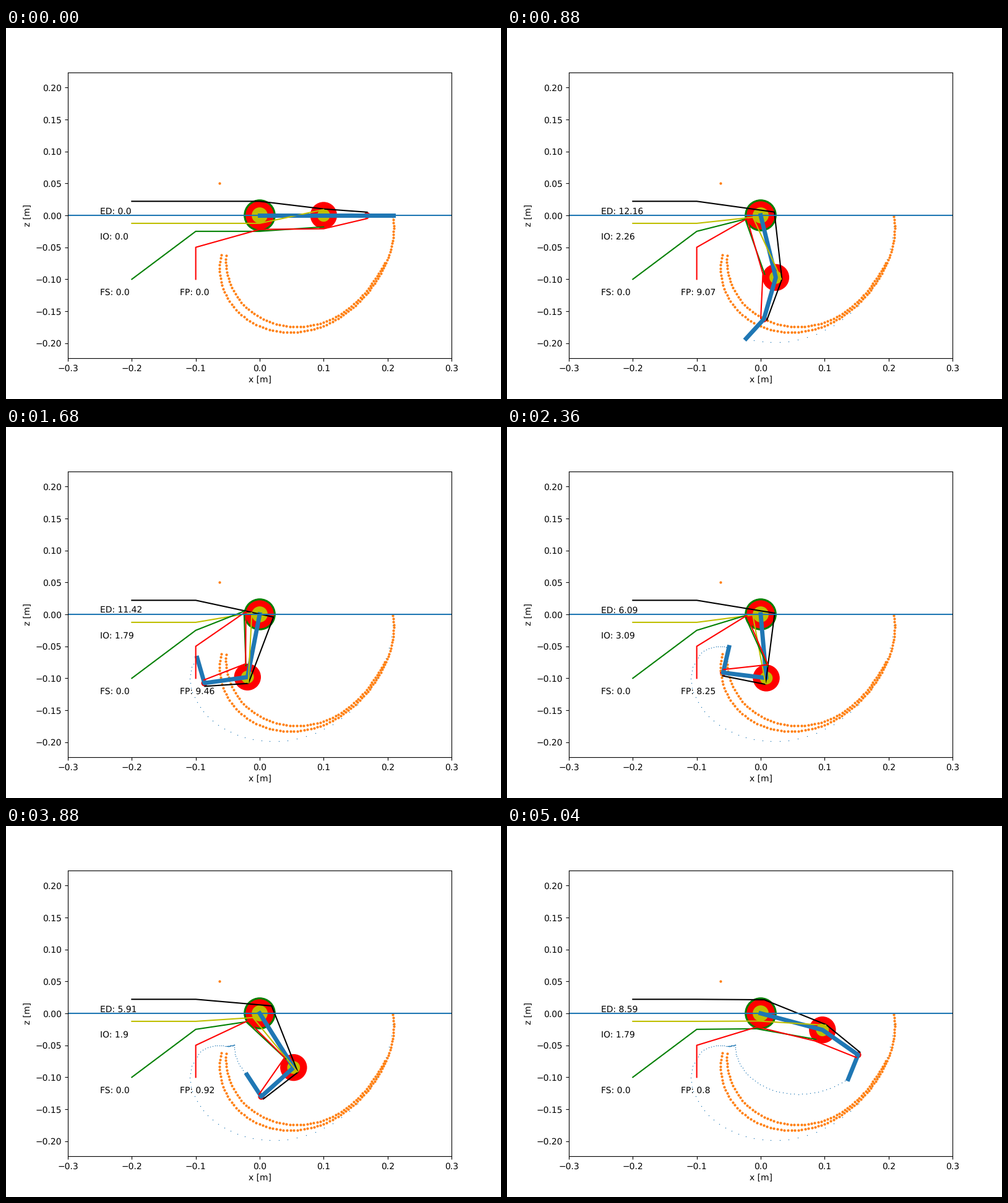
Write a matplotlib script that moves like this. It is 800x600 px and loops after 5080 ms.

```python
import numpy as np
import matplotlib.pyplot as plt
from matplotlib.animation import FuncAnimation

plt.rcParams["text.hinting"] = "none"

FRAMES, INTERVAL = 127, 40
LINKS = np.array([0.1, 0.068, 0.041])
PX = 620 / 0.6  # pixels per metre


def rise(p):
    return lambda s: s ** p


def settle(p):
    return lambda s: 1 - (1 - s) ** p


def sway(s):
    return s * s * (3 - 2 * s)


# last frame of each phase, joint angles reached in degrees, easing per joint
PHASES = [
    (42, (-101, -71, -82), (settle(1.9), rise(1.35), rise(1.75))),
    (59, (-85, -102, -96), (sway, settle(2), sway)),
    (84, (-82, -107, -100), (sway, sway, sway)),
    (126, (-15, -20, -77), (settle(1.2), rise(1), rise(2.5))),
]

# tendon forces at a few moments, linear in between
FORCE_TIMES = 0, 22, 42, 59, 81, 97, 126
FORCES = {
    "ED": (0, 12.16, 11.42, 6.09, 3.23, 5.91, 8.59),
    "IO": (0, 2.26, 1.79, 3.09, 0.69, 1.9, 1.79),
    "FP": (0, 9.07, 9.46, 8.25, 2.19, 0.92, 0.8),
}

# colour, fixed path, signed lever arm at each joint, label position
TENDONS = {
    "ED": ("k", [(-0.2, 0.022), (-0.1, 0.022)], (0.022, 0.01, 0.005), (-0.25, 0.0025)),
    "IO": ("y", [(-0.2, -0.0125), (-0.1, -0.0125)], (-0.0125, 0.009), (-0.25, -0.0375)),
    "FS": ("g", [(-0.2, -0.1), (-0.1, -0.025)], (-0.025, -0.018), (-0.25, -0.125)),
    "FP": ("r", [(-0.1, -0.1), (-0.1, -0.05)], (-0.022, -0.021, -0.005), (-0.125, -0.125)),
}

# joint, radius, colour
PULLEYS = [
    (0, 0.025, "g"), (0, 0.022, "r"), (0, 0.0125, "y"),
    (1, 0.021, "r"), (1, 0.01, "y"), (2, 0.005, "r"),
]


def joint_angles(i):
    first, pose = 0, np.zeros(3)
    for last, goal, eases in PHASES:
        s = min(max((i - first) / (last - first), 0), 1)
        pose = pose + [e(s) * (g - p) for e, g, p in zip(eases, goal, pose)]
        if i <= last:
            return pose
        first = last


def sweep(start, end, radii, count):
    """Dots on an arc whose radius is a polynomial through evenly spaced radii."""
    u = np.linspace(0, 1, count)
    nodes = np.linspace(0, 1, len(radii))
    r = np.polyval(np.polyfit(nodes, radii, len(radii) - 1), u) / PX
    a = np.radians(start + (end - start) * u)
    return np.c_[0.0726 + r * np.cos(a), -0.0261 + r * np.sin(a)]


angles = np.array([joint_angles(i) for i in range(FRAMES)])
heading = np.radians(np.cumsum(angles, axis=1))
along = np.stack([np.cos(heading), np.sin(heading)], axis=2)
normal = np.stack([-along[..., 1], along[..., 0]], axis=2)
joints = np.zeros((FRAMES, 4, 2))
joints[:, 1:] = np.cumsum(along * LINKS[:, None], axis=1)

fig, ax = plt.subplots(figsize=(8, 6), dpi=100)
ax.set_xlim(-0.3, 0.3)
ax.set_ylim(-231 / PX, 231 / PX)
ax.set_xlabel("x [m]")
ax.set_ylabel("z [m]")

trace, = ax.plot([], [], "o", color="C0", ms=1, mew=0)
track = np.vstack([
    sweep(10, -165, (142, 138, 144.5, 162.5, 169.5, 142), 91),
    sweep(-21.5, -163.5, (137, 136.3, 144.5, 153.2, 157, 151.5, 135), 70),
    [(-0.0625, 0.05)],
])
ax.plot(*track.T, "o", color="C1", ms=3, mew=0)

bones, = ax.plot([], [], color="C0", lw=5)
pulleys = [ax.add_patch(plt.Circle((0, 0), r, color=c, lw=0)) for _, r, c in PULLEYS]
cords, labels = {}, {}
for name, (color, _, _, spot) in TENDONS.items():
    cords[name], = ax.plot([], [], color=color)
    labels[name] = ax.text(*spot, "")
ax.axhline(0, color="C0")


def update(i):
    bones.set_data(*joints[i].T)
    trace.set_data(*joints[:i + 1, 3].T)
    for disc, (j, _, _) in zip(pulleys, PULLEYS):
        disc.center = joints[i, j]
    for name, (_, fixed, arms, _) in TENDONS.items():
        # the last joint keeps the direction of the middle link
        moving = [joints[i, j] + arm * normal[i, min(j, 1)]
                  for j, arm in enumerate(arms)]
        cords[name].set_data(*np.array(fixed + moving).T)
        force = 0.0
        if name in FORCES:
            force = float(np.interp(i, FORCE_TIMES, FORCES[name]))
        labels[name].set_text(f"{name}: {round(force, 2)}")
    return [bones, trace, *pulleys, *cords.values(), *labels.values()]


anim = FuncAnimation(fig, update, frames=FRAMES, interval=INTERVAL,
                     repeat=True, repeat_delay=0, blit=False)
plt.show()
```
